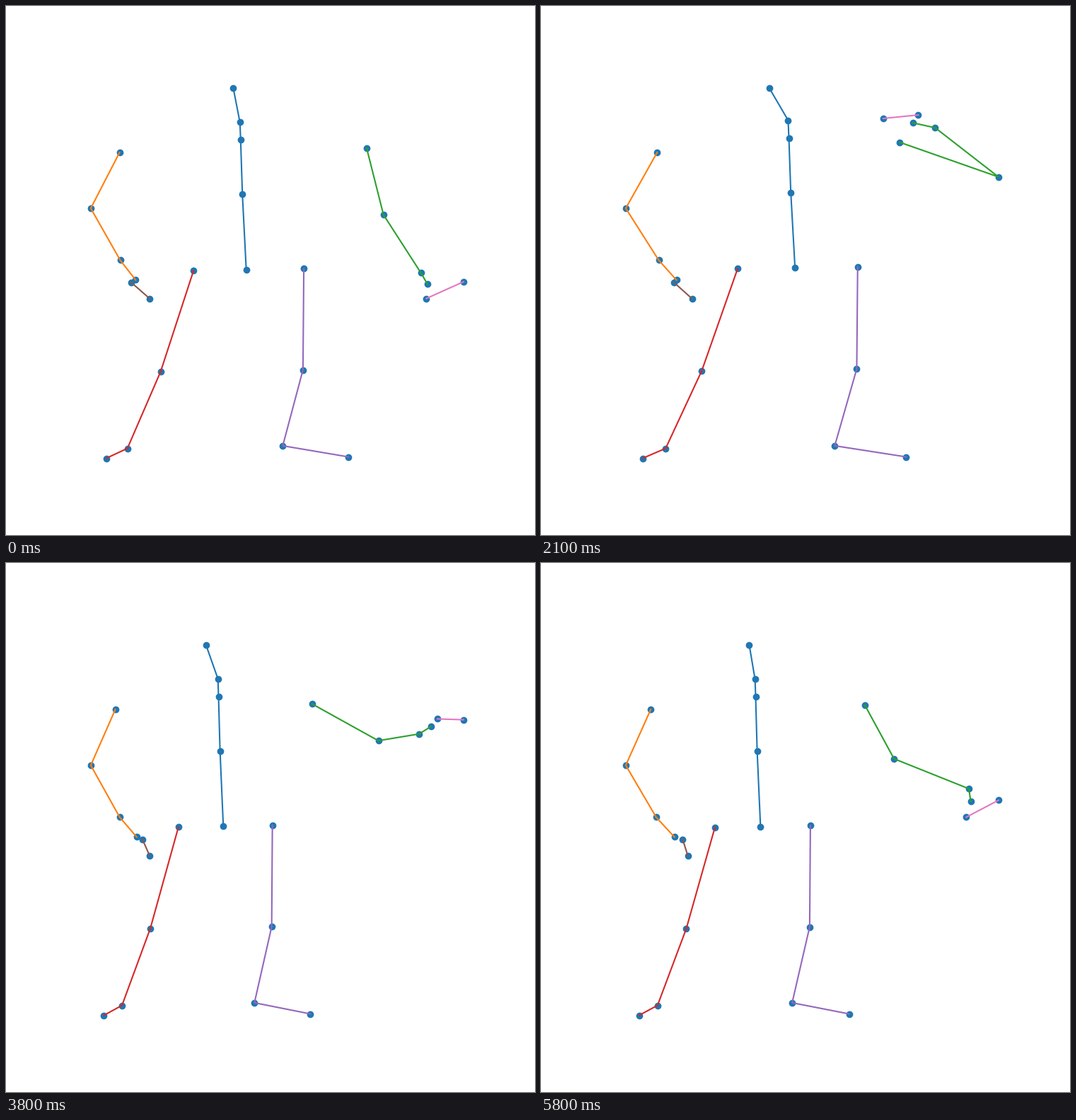
Animation of 748x748 px, one loop 5900 ms. Source, as a matplotlib script:

```python
import numpy as np
import matplotlib.pyplot as plt
from matplotlib.animation import FuncAnimation

FRAMES, STEP = 59, 100
KEYS = np.array([0, 9, 21, 27, 38, 50, 58])
FLOOR, HIP = 640, 372


def ease(*v):
    """Smooth curve without overshoot through the key values."""
    v = np.array(v, float)
    h = np.diff(KEYS)
    s = np.diff(v) / h
    m = np.r_[s[0], np.zeros(len(s) - 1), s[-1]]
    for i in range(1, len(s)):
        if s[i - 1] * s[i] > 0:
            a, b = 2 * h[i] + h[i - 1], h[i] + 2 * h[i - 1]
            m[i] = (a + b) / (a / s[i - 1] + b / s[i])
    t = np.arange(FRAMES)
    k = np.clip(np.searchsorted(KEYS, t, side="right") - 1, 0, len(h) - 1)
    u = (t - KEYS[k]) / h[k]
    return (v[k] * (1 + 2 * u) * (1 - u) ** 2
            + v[k + 1] * u * u * (3 - 2 * u)
            + h[k] * u * (1 - u) * (m[k] * (1 - u) - m[k + 1] * u))


# What drives the pose: body lean, left hand twist, right arm swing
lean = ease(0, 0.4, 0.95, 1.03, 0.65, 0.2, 0)
twist = ease(0, 0.9, 0.15, 0.4, 0.8, 0, 1)
reach = ease(24, 99, 129, 121, 111, 41, 48)
fore_len = ease(98, 72, 108, 93, 69, 114, 130)
fore_angle = ease(-57, 52, 140, 131, 8, -45, -19)
hand_angle = ease(-78, 79, 169, 163, 35, -74, -96)
lift = lean ** 4


def point(x, y):
    """Joint over all frames, as complex numbers with y down."""
    return x + 1j * y + np.zeros(FRAMES)


def raised(x, y):
    """Joint lifted by the lean, less so towards the floor."""
    return point(x, y - 3.5 * lift * min(1, (FLOOR - y) / (FLOOR - HIP)))


def polar(length, degrees):
    return length * np.exp(-1j * np.radians(degrees))


# Right arm: shoulder, elbow, wrist, then the hand
shoulder = point(393 - 36 * lean, 201.5 - 10 * lift)
elbow = shoulder + reach + 1j * (40 + 82 * np.exp(-reach / 58))
wrist = elbow + polar(fore_len, fore_angle)
up, back = np.sin(np.radians(hand_angle)), -np.cos(np.radians(hand_angle))
tip = wrist + polar(37 + 33 * np.maximum(0, back), hand_angle)
thumb = tip + 47 - 6 * up + 1j * (16 * up - 8)
hand = wrist + 0.4 * (tip - wrist) + 0.1 * (thumb - wrist)

limbs = [
    # spine
    [point(203 - 16 * lean, 116.5), raised(212.5, 165), raised(213.5, 190),
     raised(216, 267), raised(221.5, 373.5)],
    # left arm
    [point(41, 207.7), point(0, 286.6), point(42 + 8 * twist, 360),
     point(64 + 16 * twist, 388)],
    # right arm
    [shoulder, elbow, wrist, hand],
    # left leg
    [raised(146.5, 374.5), raised(99.5, 517.5), point(52.2, 626),
     point(22, FLOOR)],
    # right leg
    [raised(303.5, HIP), raised(302.3, 515), point(273.5, 622.3),
     point(367, 638)],
    # fingers
    [point(84 + 18 * twist, 414.3), point(57.5 + 36 * twist, 391.2)],
    [tip, thumb],
]
limbs = [np.array(part) for part in limbs]
body = np.concatenate(limbs)

fig, ax = plt.subplots(figsize=(7.48, 7.48), dpi=100)
ax.axis("off")
dots = ax.scatter(body[:, 0].real, body[:, 0].imag, s=36, color="C0")
lines = [ax.plot([], [], color=f"C{i}", lw=1.5)[0] for i in range(len(limbs))]


def padded(v):
    pad = 0.05 * np.ptp(v)
    return v.min() - pad, v.max() + pad


def update(i):
    pose = body[:, i]
    dots.set_offsets(np.column_stack([pose.real, pose.imag]))
    for line, part in zip(lines, limbs):
        line.set_data(part[:, i].real, part[:, i].imag)
    # the view always fits the pose
    ax.set_xlim(padded(pose.real))
    ax.set_ylim(padded(pose.imag)[::-1])
    return [dots, *lines]


anim = FuncAnimation(fig, update, frames=FRAMES, interval=STEP,
                     repeat=True, repeat_delay=0)
plt.show()
```
